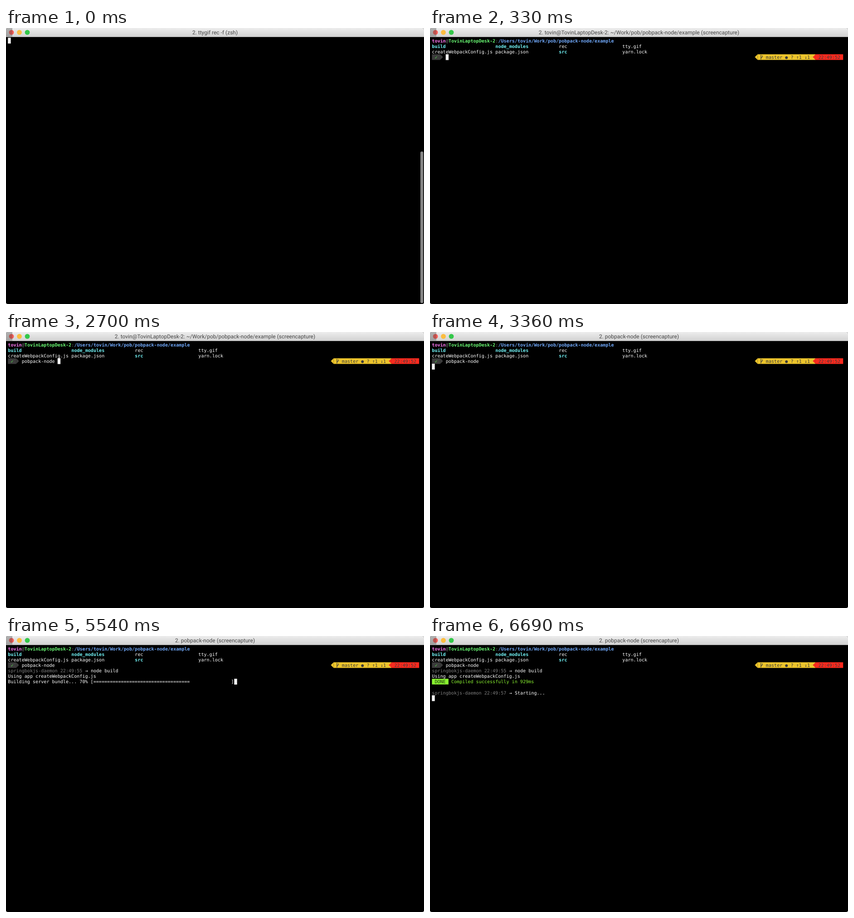
Write an HTML page with a canvas that moves like this. It is 922 by 608 pixels and loops after 8000 ms.

```html
<!DOCTYPE html>
<html lang="en">
<head>
<meta charset="utf-8">
<title>Terminal</title>
<style>
html, body { margin: 0; width: 100%; height: 100%; overflow: hidden; background: #fff; }
canvas { display: block; }
</style>
</head>
<body>
<canvas id="stage" width="922" height="608"></canvas>
<script>
const ctx = document.getElementById('stage').getContext('2d');
const W = 922, H = 608, LOOP = 8000;
const CELL = 6.087, LINE = 12.13, LEFT = 4.3, TOP = 21.5;
const MONO = '10.11px "DejaVu Sans Mono", monospace';
const C = {
  white: '#fff', dim: '#7d7d7d', dark: '#3b3b3b', magenta: '#ff79f4', green: '#68f872',
  blue: '#70a8fa', cyan: '#72f4f7', lime: '#8bf531', yellow: '#ecc42c', red: '#fc2a1e'
};
const USER = 'tovin', HOST = 'TovinLaptopDesk-2';

const colX = col => LEFT + col * CELL;
const rowY = row => TOP + row * LINE;

function put(col, row, text, color = C.white, bold = false) {
  ctx.font = (bold ? 'bold ' : '') + MONO;
  ctx.fillStyle = color;
  ctx.fillText(text, colX(col), rowY(row) + 10);
}

function block(col, row, cells, color) {
  ctx.fillStyle = color;
  ctx.fillRect(colX(col), rowY(row), cells * CELL, LINE + 0.3);
}

function cursor(col, row) {
  ctx.fillStyle = '#f6f6f6';
  ctx.fillRect(colX(col) - 0.1, rowY(row) - 0.1, CELL + 0.3, LINE + 0.7);
}

// Triangle filling one cell; dir 1 points right, -1 points left.
function wedge(col, row, dir, color) {
  const x = colX(dir > 0 ? col : col + 1), y = rowY(row);
  ctx.fillStyle = color;
  ctx.beginPath();
  ctx.moveTo(x, y);
  ctx.lineTo(x + dir * CELL, y + LINE / 2 + 0.1);
  ctx.lineTo(x, y + LINE + 0.3);
  ctx.fill();
}

function header() {
  let col = 0;
  for (const [text, color, bold] of [
    [USER, C.magenta, true], ['@', C.dim], [HOST, C.green, true], [':', C.dim],
    [`/Users/${USER}/Work/pob/pobpack-node/example`, C.blue, true]
  ]) {
    put(col, 0, text, color, bold);
    col += text.length;
  }
}

function listing() {
  put(0, 1, 'build', C.cyan, true);
  put(23, 1, 'node_modules', C.cyan, true);
  put(46, 1, 'rec');
  put(69, 1, 'tty.gif');
  put(0, 2, 'createWebpackConfig.js');
  put(23, 2, 'package.json');
  put(46, 2, 'src', C.cyan, true);
  put(69, 2, 'yarn.lock');
}

function branchIcon(x, y) {
  ctx.strokeStyle = C.dark;
  ctx.lineWidth = 1.2;
  ctx.beginPath();
  ctx.moveTo(x + 1.3, y + 1);
  ctx.lineTo(x + 1.3, y + 11.5);
  ctx.moveTo(x + 1.3, y + 8.5);
  ctx.quadraticCurveTo(x + 4.8, y + 6.5, x + 4.8, y + 2.5);
  ctx.stroke();
}

function prompt(typed) {
  block(0, 3, 3, C.dark);
  wedge(3, 3, 1, C.dark);
  put(1, 3, '✓', '#55d84d');
  put(5, 3, typed);

  wedge(117, 3, -1, C.yellow);
  block(118, 3, 21, C.yellow);
  branchIcon(colX(119), rowY(3));
  put(121, 3, 'master ● ? ↑1 ↓1', C.dark);
  wedge(138, 3, -1, C.red);
  block(139, 3, 10, C.red);
  put(140, 3, '22:49:52', C.dark);
}

function daemon(row, time, message) {
  put(0, row, 'springbokjs-daemon ' + time, C.dim);
  put(28, row, '→ ' + message);
}

function progress(percent) {
  const bar = '='.repeat(Math.round(percent / 2)).padEnd(50);
  const text = `Building server bundle... ${percent}% [${bar}]`;
  put(0, 6, text);
  cursor(text.length, 6);
}

function done() {
  block(0, 6, 6, C.lime);
  put(1, 6, 'DONE', '#16300a');
  put(7, 6, 'Compiled successfully in 929ms', C.lime);
}

// Last value whose start time has passed.
function at(t, steps) {
  let value;
  for (const [start, v] of steps) if (t >= start) value = v;
  return value;
}

const PLACE = `2. ${USER}@${HOST}: ~/Work/pob/pobpack-node/example `;
const TITLES = [
  [0, '2. ttygif rec -f (zsh)'], [100, PLACE + '(sh)'],
  [330, PLACE + '(screencapture)'], [3360, '2. pobpack-node (screencapture)']
];
const TYPING = [
  [0, ''], [1590, 'p'], [1660, 'po'], [1900, 'pob'], [2150, 'pobp'], [2310, 'pobpa'],
  [2400, 'pobpac'], [2500, 'pobpack'], [2700, 'pobpack-node ']
];
const PERCENT = [
  [4620, 0], [4720, 10],
  ...[70, 71, 72, 75, 80, 85, 90, 92, 95].map((p, i) => [5540 + i * 100, p])
];

function disc(x, color) {
  ctx.fillStyle = color;
  ctx.beginPath();
  ctx.arc(x, 9.6, 5.4, 0, 7);
  ctx.fill();
}

function titleBar(text) {
  const shade = ctx.createLinearGradient(0, 0, 0, 19);
  shade.addColorStop(0, '#ededed');
  shade.addColorStop(1, '#d2d2d2');
  ctx.fillStyle = shade;
  ctx.fillRect(0, 0, W, 19);
  ctx.fillStyle = '#aeaeae';
  ctx.fillRect(0, 19, W, 1);
  disc(12, '#f95c56');
  disc(29.5, '#fcbd40');
  disc(47, '#34c84a');
  ctx.fillStyle = 'rgba(70,70,70,.36)';
  ctx.fillRect(0, 0, 14, 19);
  ctx.font = '12px Roboto, sans-serif';
  ctx.textAlign = 'center';
  ctx.fillStyle = '#454545';
  ctx.fillText(text, W / 2, 14);
  ctx.textAlign = 'left';
}

function scrollbar() {
  ctx.fillStyle = '#868686';
  ctx.beginPath();
  ctx.roundRect(914, 272, 6.5, 334, 3.2);
  ctx.fill();
}

function output(t) {
  if (t < 100) return cursor(0, 0);
  header();
  if (t < 200) return cursor(0, 1);
  listing();
  if (t < 330) return cursor(0, 3);
  const typed = at(t, TYPING);
  prompt(typed);
  if (t < 3260) return cursor(5 + typed.length, 3);
  if (t < 4390) return cursor(0, 4);
  daemon(4, '22:49:55', 'node build');
  if (t < 4490) return cursor(0, 5);
  put(0, 5, 'Using app createWebpackConfig.js');
  if (t < 4620) return cursor(0, 6);
  if (t < 6440) return progress(at(t, PERCENT));
  if (t < 6520) return cursor(0, 6);
  done();
  if (t < 6610) return cursor(0, 7);
  if (t < 6690) return cursor(0, 8);
  daemon(8, '22:49:57', 'Starting...');
  cursor(0, 9);
}

function draw(t) {
  ctx.fillStyle = '#fff';
  ctx.fillRect(0, 0, W, H);
  ctx.save();
  ctx.beginPath();
  ctx.roundRect(0, 0, W, H, 4);
  ctx.clip();
  ctx.fillStyle = '#000';
  ctx.fillRect(0, 0, W, H);
  titleBar(at(t, TITLES));
  output(t);
  if (t < 100) scrollbar();
  ctx.restore();
}

ctx.textRendering = 'geometricPrecision';
const began = performance.now();
function tick() {
  draw((performance.now() - began) % LOOP);
  requestAnimationFrame(tick);
}
tick();
</script>
</body>
</html>
```
